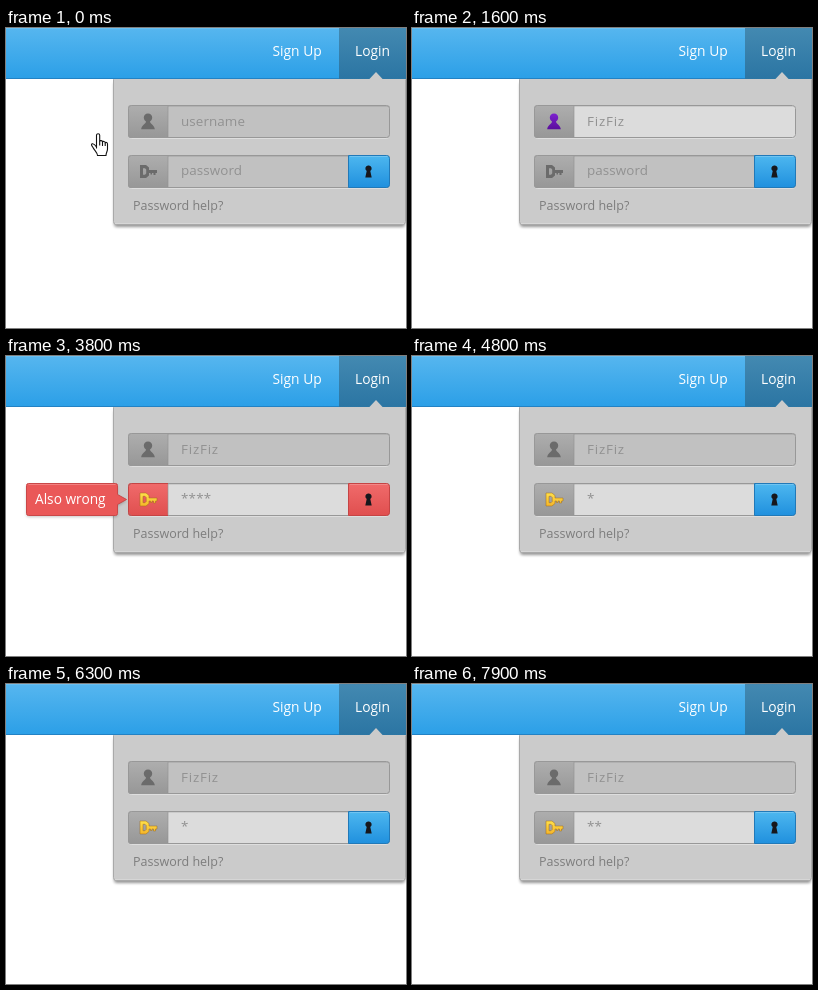
An HTML page for the animation above (8 s loop, 400x300 px).

```html
<!DOCTYPE html>
<html lang="en">
<head>
<meta charset="utf-8">
<title>Login form</title>
<style>
  html, body { margin: 0; width: 100%; height: 100%; overflow: hidden; background: #fff; }
  svg { display: block; width: 100vw; height: 100vh; }
  text { font-family: "Open Sans", "Noto Sans", sans-serif; font-size: 13.4px; white-space: pre; }
  .nav { font-size: 13.8px; fill: #fff; }
  .entry { fill: #919191; }
  .label text { fill: #fff; }
</style>
</head>
<body>
<svg viewBox="0 0 400 300">
  <defs>
    <linearGradient id="sky" x2="0" y2="1"><stop stop-color="#56b6ef"/><stop offset="1" stop-color="#2b9fe7"/></linearGradient>
    <linearGradient id="tab" x2="0" y2="1"><stop stop-color="#4389b1"/><stop offset="1" stop-color="#2b75a3"/></linearGradient>
    <linearGradient id="gray" x2="0" y2="1"><stop stop-color="#aeaeae"/><stop offset="1" stop-color="#979797"/></linearGradient>
    <linearGradient id="blue" x2="0" y2="1"><stop stop-color="#4db7ef"/><stop offset="1" stop-color="#2090de"/></linearGradient>
    <linearGradient id="red" x2="0" y2="1"><stop stop-color="#f06b6b"/><stop offset="1" stop-color="#e04f4f"/></linearGradient>
    <linearGradient id="purple" x2="0" y2="1"><stop stop-color="#7d22cf"/><stop offset="1" stop-color="#5a0e9c"/></linearGradient>
    <linearGradient id="gold" x2="0" y2="1"><stop stop-color="#ffe04a"/><stop offset="1" stop-color="#f5b52a"/></linearGradient>
    <filter id="soft" x="-10%" y="-10%" width="120%" height="125%"><feGaussianBlur stdDeviation="1.6"/></filter>
    <clipPath id="round1"><rect x="122" y="77" width="262" height="33" rx="3"/></clipPath>
    <clipPath id="round2"><rect x="122" y="127" width="262" height="33" rx="3"/></clipPath>
  </defs>

  <rect x="108" y="54" width="291" height="145" rx="3" fill="#000" opacity=".42" filter="url(#soft)"/>
  <rect x="107.5" y="48.5" width="292" height="148" rx="3" fill="#cbcbcb" stroke="#a9a9a9"/>
  <path d="M109 195.5H398" stroke="#d6d6d6"/>

  <rect width="400" height="51" fill="url(#sky)"/>
  <path d="M0 .5H333" stroke="#68bff1"/>
  <path d="M0 50.5H400" stroke="#2382c4"/>
  <rect x="333" width="67" height="51" fill="url(#tab)"/>
  <path d="M363 51.5L370 44L377 51.5Z" fill="#cbcbcb"/>
  <text class="nav" x="266.5" y="28">Sign Up</text>
  <text class="nav" x="349" y="28">Login</text>

  <g>
    <rect x="122.5" y="78.5" width="261" height="32" rx="3" fill="none" stroke="#dedede"/>
    <g clip-path="url(#round1)">
      <rect id="userField" x="122" y="77" width="262" height="33"/>
      <path d="M162 78.5H384" stroke="#000" opacity=".08"/>
      <rect x="122" y="77" width="40" height="33" fill="url(#gray)"/>
      <path d="M162 77V110" stroke="#909090" opacity=".6"/>
    </g>
    <rect x="122.5" y="77.5" width="261" height="32" rx="3" fill="none" stroke="#989898"/>
    <path id="person" d="M142 85.500C144.600 85.500 146.200 87.300 146.200 89.600C146.200 91.500 145.200 92.700 144 93.600C144.200 96.100 148.600 97.500 148.800 101.300H135.200C135.400 97.500 139.800 96.100 140 93.600C138.800 92.700 137.800 91.500 137.800 89.600C137.800 87.300 139.400 85.500 142 85.500Z"/>
    <text id="userText" class="entry" x="175" y="98" letter-spacing=".1"></text>
  </g>

  <g>
    <rect x="122.500" y="128.500" width="261" height="32" rx="3" fill="none" stroke="#dedede"/>
    <g clip-path="url(#round2)">
      <rect id="passField" x="122" y="127" width="262" height="33"/>
      <path d="M162 128.500H342" stroke="#000" opacity=".08"/>
      <rect id="keyBox" x="122" y="127" width="40" height="33"/>
      <path d="M162 127V160" stroke="#909090" opacity=".6"/>
    </g>
    <rect x="122.500" y="127.500" width="261" height="32" rx="3" fill="none" stroke="#989898"/>
    <path id="keyEdge" d="M162 127.500H125.500Q122.500 127.500 122.500 130.500V156.500Q122.500 159.500 125.500 159.500H162" fill="none" stroke="#c54444"/>
    <path id="button" d="M342.500 127.500H380.500Q383.500 127.500 383.500 130.500V156.500Q383.500 159.500 380.500 159.500H342.500Z"/>
    <path d="M344 128.500H382" stroke="#fff" opacity=".2"/>
    <path d="M363 137.500A3 3 0 0 1 364.300 143L365.700 149.500H359.300L360.700 143A3 3 0 0 1 362 137.500Z" fill="#17171c"/>
    <g id="key">
      <path fill-rule="evenodd" d="M134 137H140L143 139.500V142H151V145H149.500V147H147.500V145H146V146.500H144.500V145H143V147.500L140 150H134Z M137 140.300V146.700H139L140.200 145.500V141.500L139 140.300Z"/>
    </g>
    <text id="passText" class="entry" x="175" y="147"></text>
  </g>

  <text id="help" x="127" y="181.500" style="font-size:12.5px">Password help?</text>

  <g id="label" class="label">
    <path id="labelShadow" fill="#000" opacity=".22" transform="translate(0 1.500)" filter="url(#soft)"/>
    <path id="labelShape" fill="#ea5858" stroke="#c94848"/>
    <path id="labelShine" stroke="#f38080"/>
    <text id="line1"></text>
    <text id="line2"></text>
  </g>

  <g id="hand" fill="#fff" stroke="#111" stroke-width="1.100" stroke-linejoin="round">
    <path d="M5.500 15V2.300C5.500 .2 8.700 .2 8.700 2.300V8.500C9 7.200 11.500 7.400 11.500 9C12 7.900 14.200 8.300 14.200 9.800C14.800 9 16.500 9.500 16.500 11V16C16.500 18.500 15 19.500 15 22.500H6.500C6.500 19.500 3.500 17.500 2 14.500C.4 12.400 0 11.500 1.200 10.800C2.600 10.300 4.200 12 5.500 14Z"/>
    <path d="M8.700 8.500V12.500M11.500 9V13M14.200 10V13" fill="none"/>
  </g>
</svg>

<script>
  const LOOP = 8000, TICK = 100;
  const NAME = "FizFiz";
  const NAME_START = 1100, CLICK = 900, REACH = 800;

  // Each attempt types four stars, then may be rejected with a label.
  const attempts = [
    { start: 1800, fail: 2300, x: 20, y: 127, h: 33, tip: 143.5, lines: ["Incorrect"], tx: 39, size: 13.4 },
    { start: 3300, fail: 3800, x: 20, y: 127, h: 33, tip: 143.5, lines: ["Also wrong"], tx: 29, size: 13.7 },
    { start: 4800, fail: 5300, x: 10, y: 160, h: 33, tip: 176.5, lines: ["Have you tried"], tx: 16, size: 13.3, help: true },
    { start: 6300, fail: 6800, x: 10, y: 127, h: 49, tip: 143.5, lines: ["That one’s", "way off..."], tx: 30, size: 13, help: true },
    { start: 7800, fail: Infinity }
  ];

  const $ = id => document.getElementById(id);
  const set = (id, attrs) => {
    for (const name in attrs) $(id).setAttribute(name, attrs[name]);
  };
  const show = (id, on) => set(id, { visibility: on ? "visible" : "hidden" });
  const typed = (text, start, t) =>
    text.slice(0, Math.max(0, Math.floor((t - start) / TICK) + 1));

  function drawLabel({ x, y, h, tip, lines, tx, size }) {
    const l = x + .5, r = 111.5, top = y + .5, bottom = y + h - .5;
    const d = `M${l + 2} ${top}H${r - 2}Q${r} ${top} ${r} ${top + 2}V${tip - 5}L120.500 ${tip}L${r} ${tip + 5}` +
      `V${bottom - 2}Q${r} ${bottom} ${r - 2} ${bottom}H${l + 2}Q${l} ${bottom} ${l} ${bottom - 2}V${top + 2}Q${l} ${top} ${l + 2} ${top}Z`;
    set("labelShadow", { d });
    set("labelShape", { d });
    set("labelShine", { d: `M${l + 2} ${top + 1}H${r - 2}` });
    ["line1", "line2"].forEach((id, i) => {
      set(id, { x: tx, y: y + 20.5 + i * 18, style: `font-size:${size}px` });
      $(id).textContent = lines[i] || "";
    });
  }

  function drawHand(t) {
    const steps = (REACH - 400) / TICK;
    const p = Math.min(steps, Math.max(0, Math.floor(t / TICK) - 4)) / steps;
    const ease = p * p * (3 - 2 * p);
    set("hand", { transform: `translate(${85 + 80 * ease} ${105 - 13 * ease})` });
    show("hand", t < CLICK + TICK);
  }

  function render(t) {
    const attempt = attempts.filter(a => t >= a.start).pop();
    const wrong = !!attempt && t >= attempt.fail;
    const userActive = t >= CLICK && !attempt;

    set("userField", { fill: userActive ? "#dcdcdc" : "#c1c1c1" });
    set("person", { fill: userActive ? "url(#purple)" : "#6b6b6b" });
    $("userText").textContent = t < CLICK ? "username" : typed(NAME, NAME_START, t);
    set("userText", { "letter-spacing": t < CLICK ? .1 : .8 });

    set("passField", { fill: attempt ? "#dcdcdc" : "#c1c1c1" });
    set("passText", { "letter-spacing": attempt ? .2 : .1, fill: attempt ? "#777" : "#919191" });
    $("passText").textContent = attempt ? typed("****", attempt.start, t) : "password";

    set("key", attempt
      ? { fill: "url(#gold)", stroke: "#9c6a18", "stroke-width": .5 }
      : { fill: "#6b6b6b", stroke: "none" });
    set("keyBox", { fill: wrong ? "url(#red)" : "url(#gray)" });
    show("keyEdge", wrong);
    set("button", wrong
      ? { fill: "url(#red)", stroke: "#c54444" }
      : { fill: "url(#blue)", stroke: "#2179b8" });

    set("help", { fill: wrong && attempt.help ? "#1585ee" : "#7d7d7d" });
    show("label", wrong);
    if (wrong) drawLabel(attempt);
    drawHand(t);
  }

  const begin = performance.now();
  function frame() {
    render((performance.now() - begin) % LOOP);
    requestAnimationFrame(frame);
  }
  frame();
</script>
</body>
</html>
```
